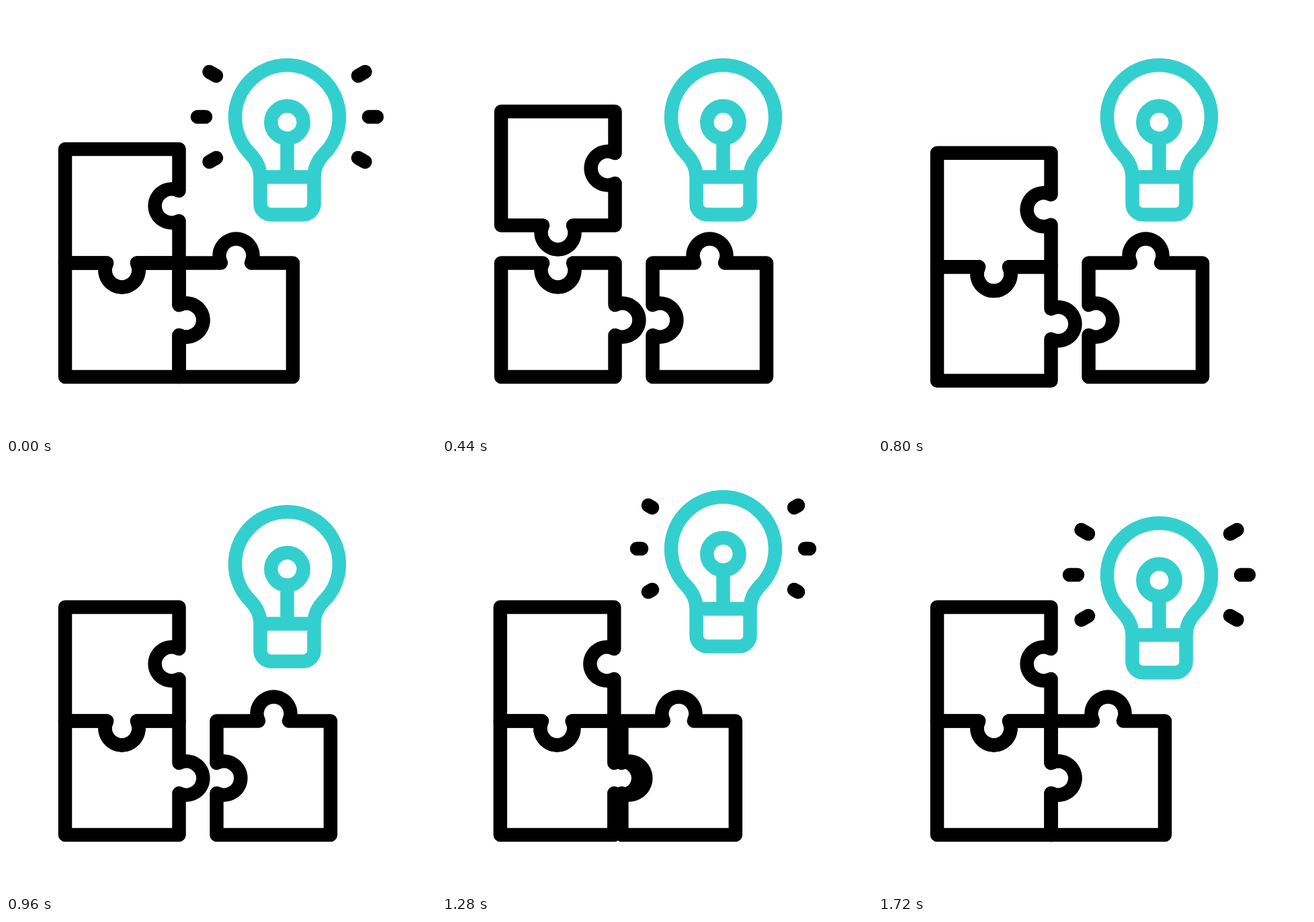
An HTML page with a canvas for the animation above (2 s loop, 640 px wide and 640 px high).

```html
<!DOCTYPE html>
<html>
<head>
<meta charset="utf-8">
<style>
html, body { margin: 0; width: 100%; height: 100%; overflow: hidden; background: #fff; }
canvas { display: block; }
</style>
</head>
<body>
<canvas width="640" height="640"></canvas>
<script>
const ctx = document.querySelector('canvas').getContext('2d');
const STEP = 40, STEPS = 50;
const BLACK = '#000', TEAL = '#33cfcf';

const topPiece = new Path2D('M88 213H257.5V275A25 25 0 1 0 257.5 320V382.5H195A25 25 0 1 1 150 382.5H88Z');
const cornerPiece = new Path2D('M88 382.5H150A25 25 0 1 0 195 382.5H257.5V445A25 25 0 1 1 257.5 490V552H88Z');
const rightPiece = new Path2D('M257.5 382.5H320A25 25 0 1 1 365 382.5H427V552H257.5V490A25 25 0 1 0 257.5 445Z');
const bulb = new Path2D(
  'M378.5 254.5C378.5 242 373 230 363.7 220.3A77.5 77.5 0 1 1 473.3 220.3C464 230 458.5 242 458.5 254.5' +
  'V294.5A16 16 0 0 1 442.5 310.5H394.5A16 16 0 0 1 378.5 294.5ZM378.5 254.5H458.5M418.5 197V254.5' +
  'M442.7 173A24.2 24.2 0 1 1 394.3 173A24.2 24.2 0 1 1 442.7 173Z');

// Right-hand rays, inner end to outer end; the left ones are mirrored.
const rays = [[524, 104, 534.5, 98], [540, 165, 552, 165], [524, 226, 534.5, 232]];
const AXIS = 418.5;

// Eased progress from 0 to 1 between steps a and b.
function ease(n, a, b) {
  const u = Math.min(1, Math.max(0, (n - a) / (b - a)));
  return u * u * (3 - 2 * u);
}

// Goes out between a and b, comes back between c and d.
const swing = (n, a, b, c, d) => ease(n, a, b) - ease(n, c, d);

function draw(path, x, y, color) {
  ctx.save();
  ctx.translate(x, y);
  ctx.strokeStyle = color;
  ctx.stroke(path);
  ctx.restore();
}

function rayPath(from, to) {
  const path = new Path2D();
  if (from >= to) return path;
  for (const [x1, y1, x2, y2] of rays) {
    for (const side of [1, -1]) {
      const x = k => AXIS + side * (x1 + (x2 - x1) * k - AXIS);
      const y = k => y1 + (y2 - y1) * k;
      path.moveTo(x(from), y(from));
      path.lineTo(x(to), y(to));
    }
  }
  return path;
}

function render(n) {
  const lift = -56 * swing(n, 1, 7.5, 12.9, 20);
  const slide = 56 * swing(n, 2, 8, 27, 34);
  const dip = 6 * swing(n, 17, 20.5, 20.5, 24);
  const nudge = -8 * swing(n, 31, 35, 35, 40);
  const rise = -41.5 * swing(n, 20, 29.2, 30.6, 40);

  ctx.fillStyle = '#fff';
  ctx.fillRect(0, 0, 640, 640);
  ctx.lineWidth = 20.5;
  ctx.lineCap = ctx.lineJoin = 'round';

  draw(topPiece, nudge, lift + dip, BLACK);
  draw(cornerPiece, nudge, dip, BLACK);
  draw(rightPiece, nudge + slide, 0, BLACK);
  draw(bulb, 0, rise, TEAL);
  const shown = n < 20 ? [ease(n, 4, 11), 1] : [0, ease(n, 27, 36)];
  draw(rayPath(...shown), 0, rise, BLACK);
}

function tick() {
  render(Math.floor(performance.now() / STEP) % STEPS);
  requestAnimationFrame(tick);
}
tick();
</script>
</body>
</html>
```
